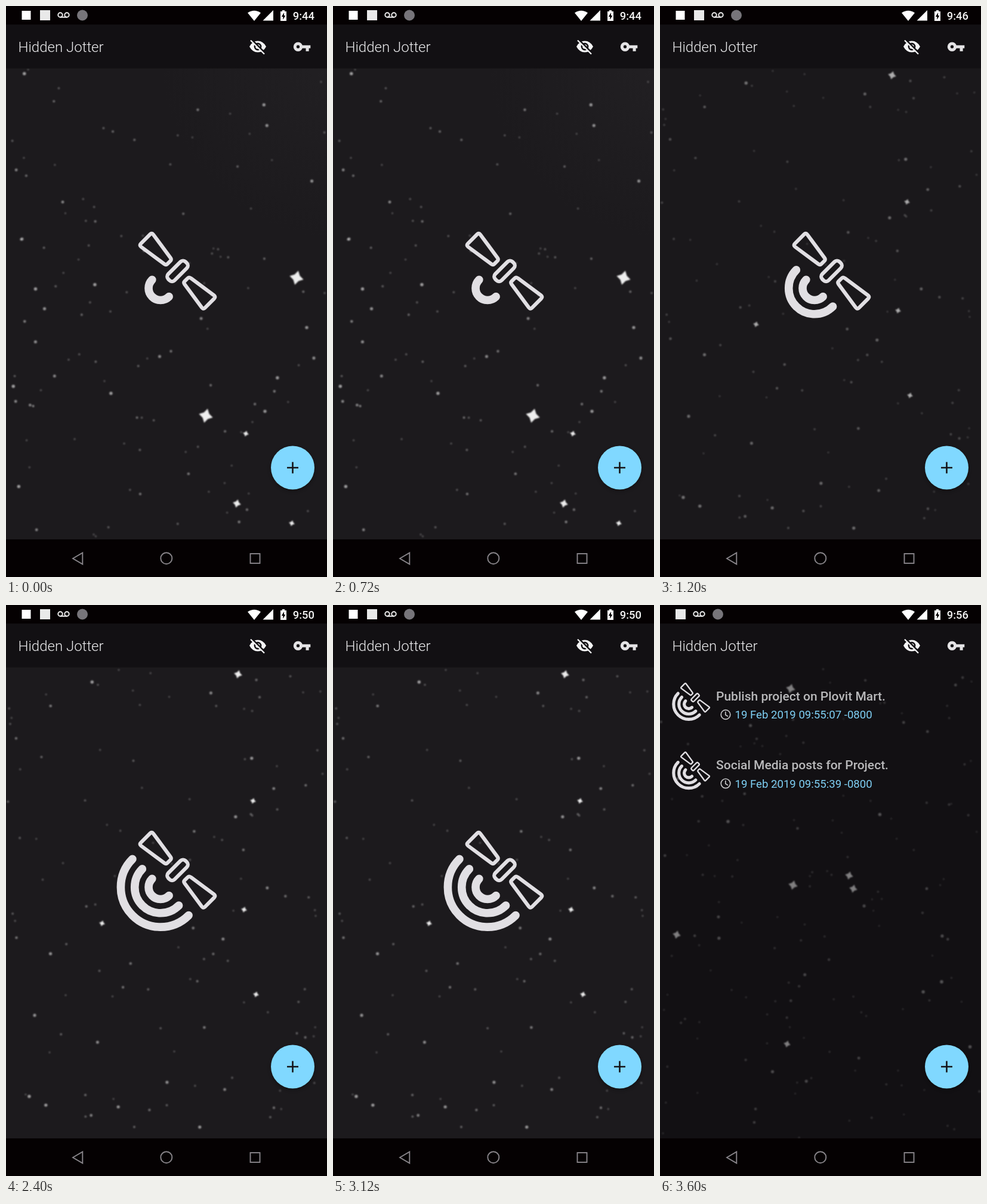
These frames come from a looping animation (538 by 956 pixels, 4.8 s). An HTML page:

```html
<!DOCTYPE html>
<html lang="en">
<head>
<meta charset="utf-8">
<title>Hidden Jotter</title>
<style>
  html, body { margin: 0; width: 100%; height: 100%; overflow: hidden; background: #050102; }
  svg { display: block; width: 100vw; height: 100vh; }
  text { font-family: Roboto, "Open Sans", sans-serif; }
  .title { font-size: 24px; font-weight: 300; fill: #ececee; }
  .time { font-size: 18.4px; font-weight: 500; fill: #f4f4f4; }
  .note { font-size: 21px; font-weight: 500; fill: #b9b9bb; }
  .date { font-size: 18.6px; fill: #7fd0f5; }
</style>
</head>
<body>
<svg viewBox="0 0 538 956" xmlns="http://www.w3.org/2000/svg">
  <defs>
    <radialGradient id="glow" gradientUnits="userSpaceOnUse" cx="560" cy="90" r="300">
      <stop offset="0" stop-color="#222023"/>
      <stop offset="1" stop-color="#1c1a1d"/>
    </radialGradient>
    <filter id="soft"><feGaussianBlur stdDeviation="0.9"/></filter>
    <filter id="shade" x="-30%" y="-30%" width="160%" height="160%"><feGaussianBlur stdDeviation="3"/></filter>
    <path id="panel" d="M24 -7.300L72 -14.500Q76 -15 76 -11V11Q76 15 72 14.500L24 7.300Q20.500 6.800 20.500 3.500V-3.500Q20.500 -6.800 24 -7.300Z"/>
    <g id="craft" transform="translate(287.500 443.800) rotate(45)" fill="none" stroke="#e1dfe3" stroke-width="6.200">
      <use href="#panel"/>
      <use href="#panel" transform="scale(-1 1)"/>
      <rect x="-7.500" y="-20.500" width="15" height="41" rx="6"/>
    </g>
  </defs>

  <rect id="sky" y="104" width="538" height="790"/>
  <g id="stars" fill="#eee" filter="url(#soft)"></g>

  <g id="loader">
    <use href="#craft"/>
    <g id="waves"></g>
  </g>
  <g id="list"></g>

  <rect y="31" width="538" height="73.500" fill="#121013"/>
  <rect width="538" height="31" fill="#050102"/>
  <rect y="893" width="538" height="63" fill="#050102"/>

  <!-- status bar -->
  <rect id="badge" x="26.500" y="8" width="15" height="15" fill="#fff"/>
  <g id="tray">
    <rect x="57" y="7" width="17" height="17" fill="#e9e9e9"/>
    <g fill="none" stroke="#eee" stroke-width="2">
      <circle cx="91" cy="15" r="3.700"/>
      <circle cx="102" cy="15" r="3.700"/>
      <path d="M91 18.700H102"/>
    </g>
    <circle cx="128" cy="15.500" r="9" fill="#77757a"/>
  </g>
  <g fill="#fff">
    <path d="M416 25L405 11.500Q416 4 427 11.500Z"/>
    <path d="M430.500 24.500H448V7Z"/>
    <path d="M460 9H463V7H467V9H470V25H460Z"/>
    <path d="M466 11L461.800 18H464.300V23L468.300 16H466Z" fill="#050102"/>
  </g>
  <text id="time" class="time" x="517" y="22.500" text-anchor="end"></text>

  <!-- app bar -->
  <text class="title" x="20.500" y="77">Hidden Jotter</text>
  <g fill="#f4f4f5">
    <path d="M408 68Q413 58.500 422 58.500T436 68Q431 77.500 422 77.500T408 68Z"/>
    <circle cx="422" cy="68" r="6.400" fill="#121013"/>
    <circle cx="422" cy="68" r="3.800"/>
    <path d="M411 55.500L435 79.500" stroke="#121013" stroke-width="3"/>
    <path d="M410 57.500L433 80.500" stroke="#f4f4f5" stroke-width="2.300"/>
  </g>
  <g fill="none" stroke="#e4e3e5" stroke-width="5.100">
    <circle cx="489.500" cy="68.200" r="5.200"/>
    <path d="M495 68.200H510.300M505.100 68.200V75.800"/>
  </g>

  <!-- add button -->
  <circle cx="480.500" cy="775.500" r="36" opacity=".4" filter="url(#shade)"/>
  <circle cx="480.500" cy="773" r="36.500" fill="#80d8ff"/>
  <path d="M471 773H490M480.500 763.500V782.500" stroke="#151417" stroke-width="2.600"/>

  <!-- navigation bar -->
  <g fill="none" stroke="#89858a" stroke-width="1.900">
    <path d="M112 925L128.300 915.500V934.500Z"/>
    <circle cx="268.800" cy="924.700" r="9.500"/>
    <rect x="409.500" y="917" width="16" height="16"/>
  </g>
</svg>
<script>
const STEP = 1200;
const byId = id => document.getElementById(id);
const show = (el, on) => el.setAttribute("display", on ? "inline" : "none");

// Only the brightest stars have fixed places: x, y, radius
const skies = [
  { seed: 11, dust: 125, bright: [[487, 455, 12], [335, 686, 12], [387, 833, 7], [402, 716, 5], [479, 866, 5]] },
  { seed: 29, dust: 125, bright: [[389, 116, 7], [399, 510, 5], [414, 328, 5], [161, 533, 5], [419, 652, 5]] },
  { seed: 47, dust: 150, bright: [[223, 469, 8], [317, 453, 7], [324, 475, 7], [28, 552, 7], [219, 140, 8], [213, 735, 6]] }
];

const scenes = [
  { time: "9:44", sky: 0, glow: 1, fill: "url(#glow)", waves: 1 },
  { time: "9:46", sky: 1, glow: 0.7, fill: "#1a181b", waves: 2 },
  { time: "9:50", sky: 1, glow: 1, fill: "#1c1a1d", waves: 3 },
  { time: "9:56", sky: 2, glow: 0.5, fill: "#121013", waves: 0, list: true }
];

function seeded(seed) {
  return () => {
    seed = (Math.imul(seed, 1664525) + 1013904223) >>> 0;
    return seed / 4294967296;
  };
}

function brightStar([x, y, r]) {
  const d = r * 0.38;
  return `<path transform="translate(${x} ${y}) rotate(14)"
    d="M0 ${-r}L${d} ${-d}L${r} 0L${d} ${d}L0 ${r}L${-d} ${d}L${-r} 0L${-d} ${-d}Z"/>`;
}

function skyMarkup({ seed, dust, bright }) {
  const rand = seeded(seed);
  const speck = () => {
    const x = rand() * 538, y = 106 + rand() * 786, size = rand() ** 3;
    return `<circle cx="${x}" cy="${y}" r="${1.8 + size}" opacity="${0.22 + size * 0.4}"/>`;
  };
  return `<g>${Array.from({ length: dust }, speck).join("")}${bright.map(brightStar).join("")}</g>`;
}

// Half ring opening toward the upper right
function wave(i) {
  const r = 20 + i * 23.3, d = r * Math.SQRT1_2;
  return `<path d="M${259 - d} ${472.5 - d}A${r} ${r} 0 0 0 ${259 + d} ${472.5 + d}"
    fill="none" stroke="#e1dfe3" stroke-width="13.6" stroke-linecap="round"/>`;
}

const waveMarkup = [0, 1, 2].map(wave).join("");

function noteMarkup(y, title, date) {
  return `<g transform="translate(0 ${y})">
    <g transform="translate(-50.5 -144) scale(.381)"><use href="#craft"/>${waveMarkup}</g>
    <text class="note" x="94" y="30">${title}</text>
    <g fill="none" stroke="#c2c2c4" stroke-width="1.7">
      <circle cx="110" cy="53.5" r="7.8"/><path d="M109.8 48.5V54L114 56.5"/>
    </g>
    <text class="date" x="125.5" y="60.3">${date}</text>
  </g>`;
}

byId("waves").innerHTML = waveMarkup;
byId("stars").innerHTML = skies.map(skyMarkup).join("");
byId("list").innerHTML =
  noteMarkup(130, "Publish project on Plovit Mart.", "19 Feb 2019 09:55:07 -0800") +
  noteMarkup(245.3, "Social Media posts for Project.", "19 Feb 2019 09:55:39 -0800");

const waves = [...byId("waves").children];
const starGroups = [...byId("stars").children];
let current = -1;

function draw(ms) {
  const index = Math.floor(ms / STEP) % scenes.length;
  if (index === current) return;
  current = index;
  const s = scenes[index];
  byId("time").textContent = s.time;
  byId("sky").setAttribute("fill", s.fill);
  byId("stars").setAttribute("opacity", s.glow);
  starGroups.forEach((g, i) => show(g, i === s.sky));
  waves.forEach((w, i) => show(w, i < s.waves));
  show(byId("loader"), !s.list);
  show(byId("list"), s.list);
  show(byId("badge"), !s.list);
  byId("tray").setAttribute("transform", `translate(${s.list ? -31 : 0} 0)`);
}

const start = performance.now();
function tick() {
  draw(performance.now() - start);
  requestAnimationFrame(tick);
}
tick();
</script>
</body>
</html>
```
